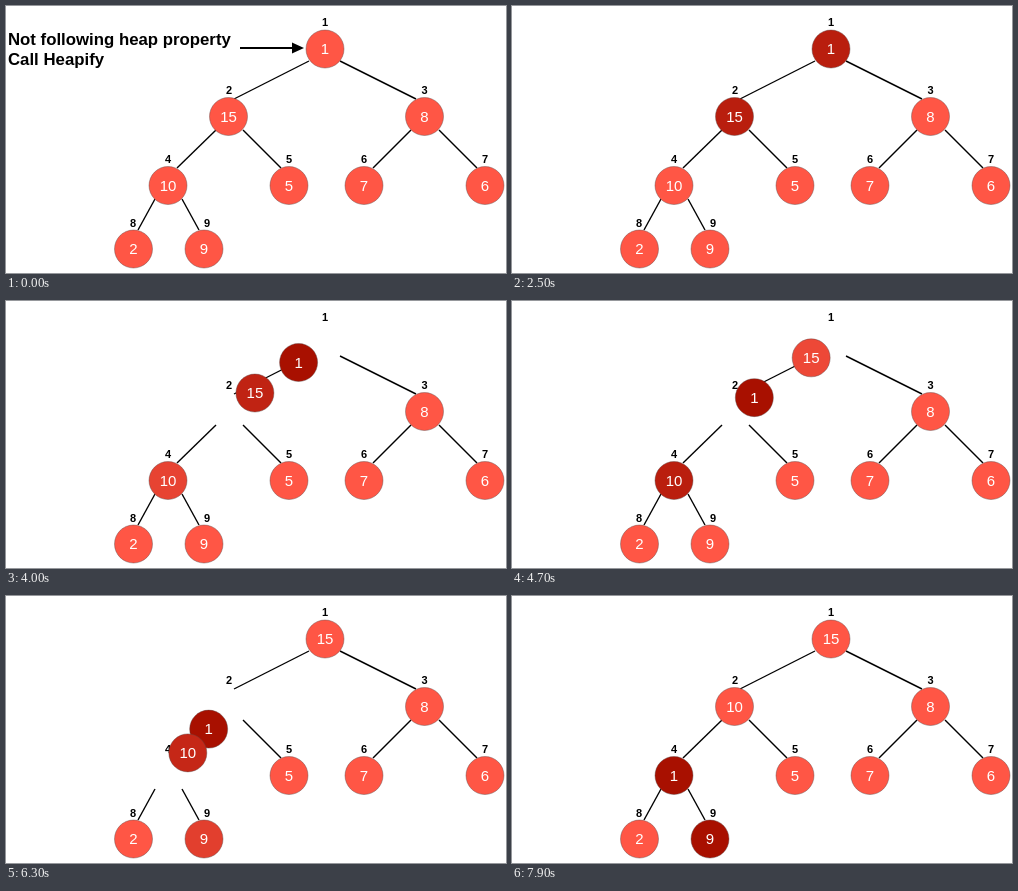
Write an HTML page with a canvas that moves like this. It is 500 px wide and 267 px high and loops after 8 s.

```html
<!DOCTYPE html>
<html>
<head>
<meta charset="utf-8">
<title>Heapify</title>
<style>
html, body { margin: 0; width: 100%; height: 100%; overflow: hidden; background: #fff; }
canvas { display: block; }
</style>
</head>
<body>
<canvas id="stage" width="500" height="267"></canvas>
<script>
const LOOP = 8000, MOVE = 2000;
const STARTS = [1090, 3300, 5525]; // highlight, first swap, second swap
const FONT = '"Liberation Sans", Arial, Helvetica, sans-serif';
const LIGHT = [255, 86, 69], DARK = [168, 16, 0];
const ctx = document.getElementById('stage').getContext('2d');

const slots = [[319, 43], [222.5, 110.5], [418.5, 110.5], [162, 179.5], [283, 179.5],
  [358, 179.5], [479, 179.5], [127.5, 243], [198, 243]];
const labels = [[319, 16], [223, 84], [418.5, 84], [162, 153.5], [283, 153.5],
  [358, 153.5], [479, 153.5], [127, 217.5], [201, 217.5]];
const edges = [[303, 55, 228, 93], [334, 55, 410, 93], [210, 124, 171, 162], [237, 124, 275, 162],
  [405, 124, 367, 162], [433, 124, 471, 162], [149, 193, 132, 224], [176, 193, 193, 224]];
const values = [1, 15, 8, 10, 5, 7, 6, 2, 9];

const clamp = x => Math.min(1, Math.max(0, x));
const ease = x => (1 - Math.cos(Math.PI * clamp(x))) / 2;
const mix = (a, b, p) => a.map((v, i) => v + (b[i] - v) * p);

function text(str, x, y, size, color, weight = 'bold', align = 'center') {
  ctx.font = `${weight} ${size}px ${FONT}`;
  ctx.fillStyle = color;
  ctx.textAlign = align;
  ctx.fillText(str, x, y);
}

function line(x1, y1, x2, y2, width) {
  ctx.lineWidth = width;
  ctx.strokeStyle = '#000';
  ctx.beginPath();
  ctx.moveTo(x1, y1);
  ctx.lineTo(x2, y2);
  ctx.stroke();
}

function node(value, [x, y], dark) {
  ctx.beginPath();
  ctx.arc(x, y, 19, 0, 2 * Math.PI);
  ctx.fillStyle = `rgb(${mix(LIGHT, DARK, dark).map(Math.round)})`;
  ctx.fill();
  ctx.lineWidth = 0.6;
  ctx.strokeStyle = 'rgba(90, 70, 70, 0.7)';
  ctx.stroke();
  text(value, x, y + 5.3, 15, '#fff', 'normal');
}

function caption(alpha) {
  ctx.globalAlpha = alpha;
  text('Not following heap property', 2, 39, 16.8, '#000', 'bold', 'left');
  text('Call Heapify', 2, 59, 16.8, '#000', 'bold', 'left');
  line(234, 42, 288, 42, 2);
  ctx.beginPath();
  ctx.moveTo(298, 42);
  ctx.lineTo(286, 36.5);
  ctx.lineTo(286, 47.5);
  ctx.fill();
  ctx.globalAlpha = 1;
}

function draw(t) {
  const [mark, swap1, swap2] = STARTS.map(s => ease((t - s) / MOVE));
  const places = slots.slice();
  places[0] = mix(mix(slots[0], slots[1], swap1), slots[3], 0);
  if (swap2 > 0) places[0] = mix(slots[1], slots[3], swap2);
  places[1] = mix(slots[1], slots[0], swap1);
  places[3] = mix(slots[3], slots[1], swap2);
  const dark = { 0: mark, 1: mark - swap1, 3: swap1 - swap2, 8: swap2 };

  ctx.fillStyle = '#fff';
  ctx.fillRect(0, 0, 500, 267);
  edges.forEach(e => line(...e, 1.4));
  labels.forEach(([x, y], i) => text(i + 1, x, y + 3.8, 11, '#000'));
  values.forEach((v, i) => node(v, places[i], dark[i] || 0));
  caption(1 - ease(((t - STARTS[0]) / MOVE - 0.15) / 0.45));
}

const begin = performance.now();
function frame() {
  draw((performance.now() - begin) % LOOP);
  requestAnimationFrame(frame);
}
frame();
</script>
</body>
</html>
```
